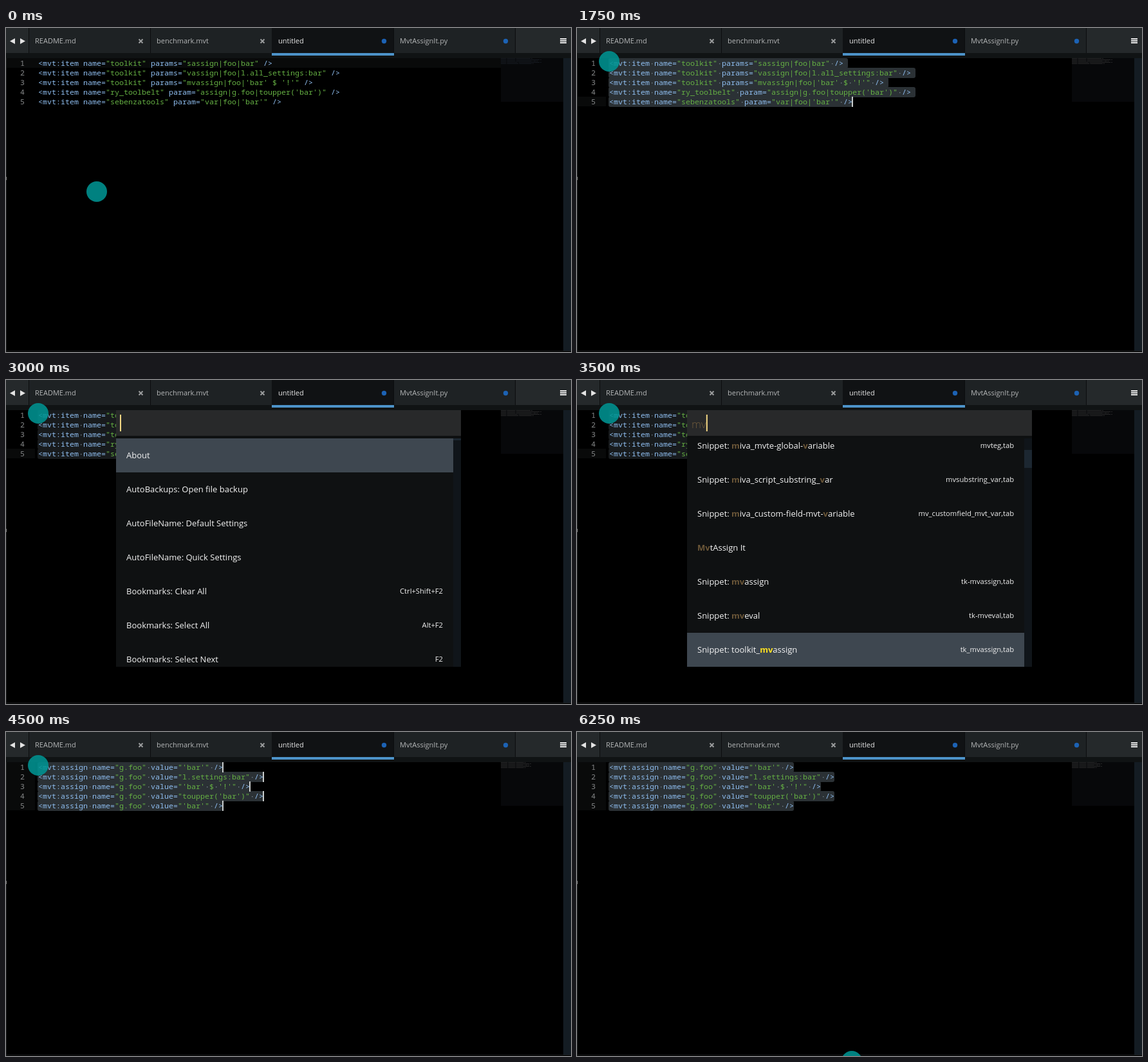
These frames come from a looping animation (878x505 px, 6500 ms). An HTML page with a canvas:

```html
<!DOCTYPE html>
<html lang="en">
<head>
<meta charset="utf-8">
<title>Editor demo</title>
<style>
html, body { margin: 0; width: 100%; height: 100%; overflow: hidden; background: #000; }
canvas { display: block; }
</style>
</head>
<body>
<canvas id="stage" width="878" height="505"></canvas>
<script>
const ctx = document.getElementById('stage').getContext('2d');
const LOOP = 6500, STEP = 250;
const CODE = '11.667px "Noto Sans Mono", "DejaVu Sans Mono", monospace';
const UI = '"Open Sans", "Noto Sans", sans-serif';
const CHAR = 7, LEFT = 50, TOP = 47, ROW = 15;

const before = [
  '<mvt:item name="toolkit" params="sassign|foo|bar" />',
  '<mvt:item name="toolkit" params="vassign|foo|l.all_settings:bar" />',
  '<mvt:item name="toolkit" params="mvassign|foo|\'bar\' $ \'!\'" />',
  '<mvt:item name="ry_toolbelt" param="assign|g.foo|toupper(\'bar\')" />',
  '<mvt:item name="sebenzatools" param="var|foo|\'bar\'" />'
];
const after = ["'bar'", 'l.settings:bar', "'bar' $ '!'", "toupper('bar')", "'bar'"]
  .map(v => `<mvt:assign name="g.foo" value="${v}" />`);

// Square brackets mark the matched letters of a label.
const moves = [
  ['[M]o[v]e [Ta]b: To first position'],
  ['[M]o[v]e [Ta]b: To last position'],
  ['[M]o[v]e [Ta]b: To the left', 'Ctrl+Shift+Pageup'],
  ['[M]o[v]e [Ta]b: To the right', 'Ctrl+Shift+Pagedown']
];
const narrow = (rows, from, to) => rows.map(([s, k]) => [s.replace(from, to), k]);
const global = [
  ['Snippet: miva_[mvta]-global-variable', 'mvtag,tab'],
  ['Snippet: miva_[mvt]-glob[a]l-variable', 'mvtg,tab']
];
const palettes = [
  { at: 3000, query: '', pick: 0, thumb: [91, 3], rows: [
    ['About'],
    ['AutoBackups: Open file backup'],
    ['AutoFileName: Default Settings'],
    ['AutoFileName: Quick Settings'],
    ['Bookmarks: Clear All', 'Ctrl+Shift+F2'],
    ['Bookmarks: Select All', 'Alt+F2'],
    ['Bookmarks: Select Next', 'F2']
  ] },
  { at: 3250, query: 'm', pick: 0, thumb: [91, 12], rows: [
    ['[M]vtAssign It'],
    ...narrow(moves, /\[M\].*\[Ta\]/, '[M]ove Ta'),
    ['Snippet: [m]vassign', 'tk-mvassign,tab'],
    ['Snippet: [m]veval', 'tk-mveval,tab']
  ] },
  { at: 3500, query: 'mv', pick: 6, shift: -15, thumb: [109, 28], rows: [
    ['Snippet: [m]iva_mvte-global-[v]ariable', 'mvteg,tab'],
    ['Snippet: [m]iva_script_substring_[v]ar', 'mvsubstring_var,tab'],
    ['Snippet: [m]iva_custom-field-mvt-[v]ariable', 'mv_customfield_mvt_var,tab'],
    ['[Mv]tAssign It'],
    ['Snippet: [mv]assign', 'tk-mvassign,tab'],
    ['Snippet: [mv]eval', 'tk-mveval,tab'],
    ['Snippet: toolkit_[mv]assign', 'tk_mvassign,tab']
  ] },
  { at: 3750, query: 'mvt', pick: 0, thumb: [91, 34], rows: [
    ['[Mvt]Assign It'],
    ['Snippet: miva_[mvt]a-global-variable', 'mvtag,tab'],
    ['Snippet: miva_[mvt]-global-variable', 'mvtg,tab'],
    ...narrow(moves, '[Ta]', '[T]a')
  ] },
  { at: 4000, query: 'mvta', pick: 0, thumb: [91, 43],
    rows: [['[MvtA]ssign It'], global[0], ...moves, global[1]] }
];

function box(x, y, w, h, color) {
  ctx.fillStyle = color;
  ctx.fillRect(x, y, w, h);
}

function text(s, x, y, font, color, align = 'left') {
  ctx.font = font;
  ctx.fillStyle = color;
  ctx.textAlign = align;
  ctx.fillText(s, x, y);
  return ctx.measureText(s).width;
}

function disc(x, y, r, color) {
  ctx.fillStyle = color;
  ctx.beginPath();
  ctx.arc(x, y, r, 0, Math.PI * 2);
  ctx.fill();
}

function poly(points, color) {
  ctx.fillStyle = color;
  ctx.beginPath();
  points.forEach(([x, y]) => ctx.lineTo(x, y));
  ctx.fill();
}

function cross(x, y) {
  ctx.strokeStyle = '#9a9c9d';
  ctx.lineWidth = 2;
  ctx.beginPath();
  for (const d of [-3, 3]) {
    ctx.moveTo(x - 3, y - d);
    ctx.lineTo(x + 3, y + d);
  }
  ctx.stroke();
}

function tabs() {
  box(0, 0, 878, 39, '#25292b');
  box(0, 39, 878, 8, '#101314');
  poly([[6, 20.5], [14, 16], [14, 25]], '#e4e4e4');
  poly([[30, 20.5], [22, 16], [22, 25]], '#e4e4e4');
  ['README.md', 'benchmark.mvt', 'untitled', 'MvtAssignIt.py'].forEach((name, i) => {
    const x = 35 + i * 189, on = i === 2;
    box(x, 0, 189, 39, on ? '#101214' : '#1e2224');
    if (!on) box(x, 0, 1, 39, '#0b0d0e');
    text(name, x + 10, 24, '11px ' + UI, on ? '#e6e6e6' : '#b4b6b7');
    if (i < 2) cross(x + 174.5, 20.5);
    else disc(x + 174.5, 20.5, 3.7, '#1c62b4');
  });
  box(791, 0, 1, 39, '#0b0d0e');
  box(413, 39, 190, 4, '#4d93c9');
  for (const y of [16, 19, 22]) box(861, y, 10, 2, '#e8e8e8');
}

function minimap(lines, selected) {
  box(769, TOP, 97, 68, '#07080a');
  lines.forEach((line, i) => {
    for (const m of line.matchAll(/\S+/g))
      box(769 + m.index * 0.94, TOP + i * 2, m[0].length * 0.94, 1, selected ? '#29292a' : '#171b22');
  });
}

function codeLine(line, y, dots) {
  let inside = false;
  [...line].forEach((c, i) => {
    const quote = c === '"';
    const color = inside || quote ? '#65b043' : '#8fbef0';
    if (quote) inside = !inside;
    const x = LEFT + i * CHAR;
    if (c !== ' ') text(c, x, y + 12, CODE, color);
    else if (dots) box(x + 3, y + 8, 1.4, 1.4, '#71808a');
  });
}

// Caret brightness follows the blink cycle of the editor.
function caretLevel(t) {
  if (t < 3000) return t === 2000 || t === 2750 ? 0 : 1;
  return [1, 0.5, 0, 0.5, 1, 1, 0.5, 0][(t - 4500) / STEP];
}

function editor(t) {
  const done = t >= 4500, selected = t >= 1750;
  const open = t >= 3000 && !done;
  const lines = done ? after : before;
  lines.forEach((line, i) => {
    const y = TOP + i * ROW;
    const active = done || i === (selected ? 4 : 0);
    if (active) box(0, y, t < 1000 ? 769 : 45, ROW, '#090a0a');
    if (selected) {
      const end = line.length * CHAR + (done || i === 4 ? 1 : 8);
      ctx.fillStyle = open ? '#181b1d' : '#2b3135';
      ctx.beginPath();
      ctx.roundRect(LEFT - 1, y, end, ROW + 1, 3);
      ctx.fill();
    }
  });
  lines.forEach((line, i) => {
    const y = TOP + i * ROW;
    const last = done || i === 4;
    text(i + 1, 29, y + 12, CODE, '#858788', 'right');
    codeLine(line, y, selected);
    if (selected && !open && last) {
      ctx.globalAlpha = caretLevel(t);
      box(LEFT + line.length * CHAR - 1, y, 2, ROW + 1, '#c8cccc');
      ctx.globalAlpha = 1;
    }
  });
  minimap(lines, selected);
  box(866, TOP, 12, 456, '#141c23');
  box(0, 47, 1, 458, '#1c1e1f');
  box(0, 503, 878, 1, '#1b1d1e');
  box(0, 232, 1, 5, '#8a8a8a');
}

function label(s, x, y, picked) {
  s.split(/[[\]]/).forEach((part, i) => {
    const hit = i % 2;
    const color = !hit ? '#f4f4f4' : picked ? '#ffe21f' : '#6c5738';
    x += text(part, x, y, (hit ? 'bold ' : '') + '13px ' + UI, color);
  });
}

function palette(p, t) {
  const { query, pick, rows, thumb, shift = 0 } = p;
  ctx.save();
  ctx.beginPath();
  ctx.rect(171, TOP, 536, 400);
  ctx.clip();
  box(171, 47, 536, 400, '#0f1112');
  box(695, 91, 12, 356, '#10151a');
  box(695, thumb[0], 12, thumb[1], '#1c2731');
  rows.forEach(([name, key], i) => {
    const y = 91 + shift + i * 53;
    if (i === pick) box(171, y, 524, 53, '#3e4750');
    label(name, 187, y + 31, i === pick);
    if (key) text(key, 679, y + 30, '11.2px ' + UI, '#f0f0f0', 'right');
  });
  box(171, 47, 536, 40, '#28292a');
  box(171, 87, 536, 4, '#0e1011');
  const w = text(query, 178, 75, '300 17px ' + UI, '#705b3c');
  box(177 + w + (query ? 1 : 0), 54, 2, 26, t === 4250 ? '#6c5c40' : '#f5d884');
  ctx.restore();
}

// Pointer positions by time; it rests on the last one until the next.
const route = [
  [0, 141, 255], [250, 57, 101], [500, 49, 57], [750, 50, 52],
  [5750, 398, 315], [6000, 411, 445], [6250, 427, 513]
];

function draw(now) {
  const t = Math.floor((now % LOOP) / STEP) * STEP;
  box(0, 0, 878, 505, '#000');
  tabs();
  editor(t);
  const [, x, y] = route.findLast(p => p[0] <= t);
  disc(x, y, 16, 'rgba(0, 148, 147, 0.87)');
  if (t >= 3000 && t < 4500) palette(palettes.findLast(p => p.at <= t), t);
}

let start;
function tick(now) {
  start ??= now;
  draw(now - start);
  requestAnimationFrame(tick);
}
draw(0);
requestAnimationFrame(tick);
</script>
</body>
</html>
```
